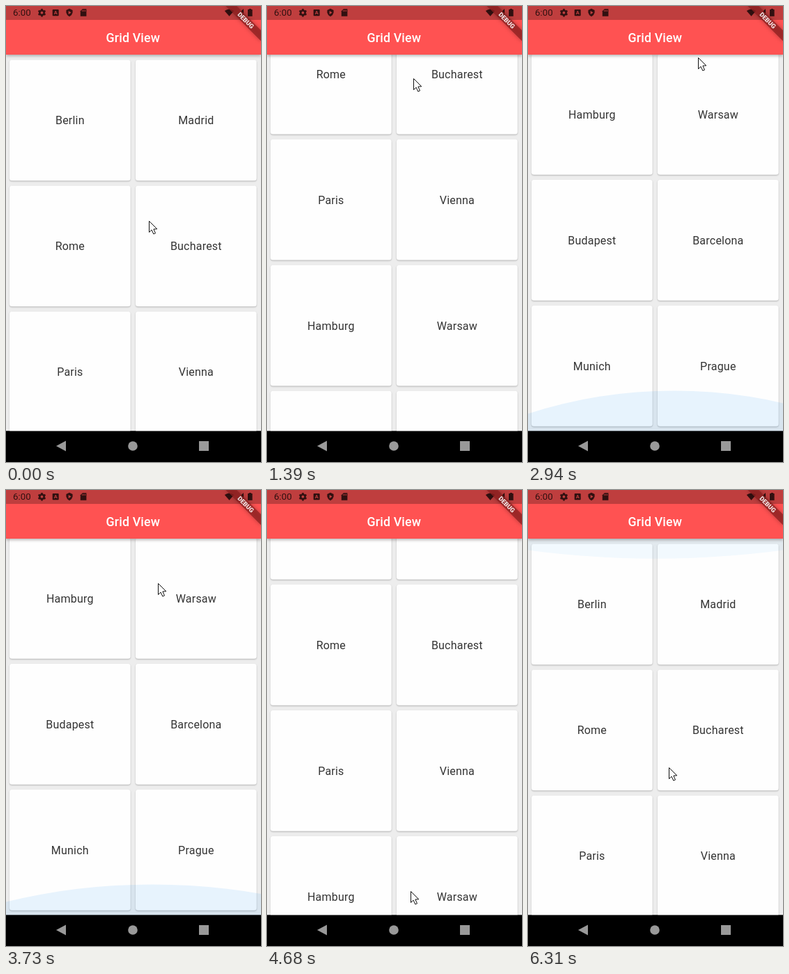
An HTML page with a canvas for the animation above (7200 ms loop, 366 by 656 pixels).

```html
<!DOCTYPE html>
<html lang="en">
<head>
<meta charset="utf-8">
<title>Grid View</title>
<style>
html, body { margin: 0; width: 100%; height: 100%; overflow: hidden; background: #000; }
canvas { display: block; width: 366px; height: 656px; }
</style>
</head>
<body>
<canvas id="stage" width="366" height="656"></canvas>
<script>
const ctx = document.getElementById('stage').getContext('2d');
const W = 366, LOOP = 7200, TOP = 70, BOTTOM = 611.6;
const PITCH = 181, CARD = 173.7, MAX_SCROLL = 551.5;
const FIRST = 400, STEP = 133.5;   // screen refresh, ms
const FONT = 'Roboto, "Open Sans", sans-serif';
const CITIES = ['Berlin', 'Madrid', 'Rome', 'Bucharest', 'Paris', 'Vienna',
  'Hamburg', 'Warsaw', 'Budapest', 'Barcelona', 'Munich', 'Prague'];

// Pointer way points: time, x, y
const PATH = [[267, 205, 309], [700, 210, 366], [934, 212, 351.5], [1334, 210, 104],
  [2136, 218, 108], [2269, 225, 279], [2536, 228, 305], [2936, 244, 74], [3337, 230, 106],
  [3738, 212, 148], [4138, 204, 260], [4672, 206, 577], [5070, 208, 648], [5340, 206, 389],
  [5607, 199, 282], [6030, 202, 399]];

// Each drag moves the grid with the pointer, then flings it on
const DRAGS = [
  { from: 934, to: 1334, fling: 152 },
  { from: 2536, to: 2936, fling: 0 },
  { from: 3738, to: 4672, fling: -122.5 },
];

const clamp = (v, lo = 0, hi = 1) => Math.min(hi, Math.max(lo, v));
const mix = (a, b, u) => a + (b - a) * u;
const ramp = (t, from, to) => clamp((t - from) / (to - from));
const easeOut = u => 1 - (1 - u) ** 3;

function pointerAt(t) {
  const i = PATH.findIndex(p => p[0] > t);
  if (i < 1) return PATH.at(i).slice(1);
  const [t0, x0, y0] = PATH[i - 1], [t1, x1, y1] = PATH[i], u = ramp(t, t0, t1);
  return [mix(x0, x1, u), mix(y0, y1, u)];
}

function scrollAt(t) {
  let s = 0;
  for (const { from, to, fling } of DRAGS) {
    if (t < from) break;
    const pulled = pointerAt(from)[1] - pointerAt(Math.min(t, to))[1];
    s = clamp(s + pulled + fling * easeOut(ramp(t, to, to + 900)), 0, MAX_SCROLL);
  }
  return s;
}

// Swells to full size, then shrinks to rest
function glowSize(t, from, peak, fall, rest, restSize) {
  return .79 * ramp(t, from, peak) - (.79 - restSize) * ramp(t, fall, rest);
}

function rect(x, y, w, h, color) {
  ctx.fillStyle = color;
  ctx.fillRect(x, y, w, h);
}

function poly(points, color) {
  ctx.beginPath();
  points.forEach(([x, y]) => ctx.lineTo(x, y));
  ctx.closePath();
  ctx.fillStyle = color;
  ctx.fill();
}

function rounded(x, y, w, h, r, color) {
  ctx.beginPath();
  ctx.roundRect(x, y, w, h, r);
  ctx.fillStyle = color;
  ctx.fill();
}

function text(str, x, y, size, color, weight = 400, spacing = 0, align = 'center') {
  ctx.font = `${weight} ${size}px ${FONT}`;
  ctx.letterSpacing = spacing + 'px';
  ctx.textAlign = align;
  ctx.fillStyle = color;
  ctx.fillText(str, x, y);
}

function withShadow(alpha, blur, dy, paint) {
  ctx.save();
  ctx.shadowColor = `rgba(0,0,0,${alpha})`;
  ctx.shadowBlur = blur;
  ctx.shadowOffsetY = dy;
  paint();
  ctx.restore();
}

function card(label, x, y) {
  withShadow(.25, 2, 1, () => rounded(x, y, CARD, CARD, 3.5, '#fefefe'));
  text(label, x + CARD / 2, y + 92.9, 16, '#343434', 400, .22);
}

// Overscroll glow: a wide circle flattened against one edge
function glow(size, x, edge, dir, alpha) {
  if (size <= 0) return;
  const r = W * 1.5, depth = 73.5;
  ctx.beginPath();
  ctx.ellipse(x, edge + dir * (depth - r) * size, r, r * size, 0, 0, Math.PI * 2);
  ctx.fillStyle = `rgba(33,150,243,${alpha})`;
  ctx.fill();
}

function grid(t) {
  const s = scrollAt(t);
  ctx.save();
  ctx.beginPath();
  ctx.rect(0, TOP, W, BOTTOM - TOP);
  ctx.clip();
  rect(0, TOP, W, BOTTOM - TOP, '#ededed');
  CITIES.forEach((city, i) => card(city, 5 + i % 2 * PITCH, 77.5 + (i >> 1) * PITCH - s));
  if (t < 3800) glow(glowSize(t, 2670, 2936, 3080, 3600, .6), 210, BOTTOM, -1, .1);
  glow(glowSize(t, 5640, 6000, 6030, 6270, .39), 183, TOP, 1, .05);
  ctx.restore();
}

function statusIcons() {
  const c = 'rgba(0,0,0,.74)', bar = '#bf3e3e';
  text('6:00', 10, 14.3, 13.3, c, 400, 0, 'left');

  // Gear
  ctx.strokeStyle = c;
  ctx.lineWidth = 2.6;
  ctx.beginPath();
  ctx.arc(51.5, 9.7, 3.2, 0, Math.PI * 2);
  for (let i = 0; i < 6; i++) {
    const a = (i + .5) * Math.PI / 3, dx = Math.cos(a), dy = Math.sin(a);
    ctx.moveTo(51.5 + dx * 4.4, 9.7 + dy * 4.4);
    ctx.lineTo(51.5 + dx * 5.7, 9.7 + dy * 5.7);
  }
  ctx.stroke();

  // Letter box
  rounded(66.7, 5, 9, 9.2, 1, c);
  text('A', 71.2, 12.3, 7.5, bar, 700);

  // Shield
  poly([[91, 3.8], [95.6, 6], [95.6, 9.5], [94, 13], [91, 15.3], [88, 13], [86.4, 9.5], [86.4, 6]], c);
  poly([[89.7, 7], [93.6, 9.5], [89.7, 12]], bar);

  // Memory card
  poly([[109.8, 4.2], [115.4, 4.2], [115.4, 14.8], [106.8, 14.8], [106.8, 7.2]], c);
  for (let i = 0; i < 3; i++) rect(109.2 + i * 1.9, 5.8, .9, 2.2, bar);

  // Wifi, signal, battery
  ctx.beginPath();
  ctx.moveTo(320.5, 14.8);
  ctx.lineTo(313.8, 7);
  ctx.quadraticCurveTo(320.5, 2, 327.2, 7);
  ctx.fillStyle = c;
  ctx.fill();
  poly([[341, 4], [341, 14.6], [330.4, 14.6]], c);
  rect(347, 5, 6.6, 9.8, c);
  rect(348.8, 4, 3, 1, c);
}

function appBar() {
  withShadow(.28, 4, 1.5, () => rect(0, 0, W, TOP, '#ff5252'));
  rect(0, 0, W, 20, 'rgba(0,0,0,.25)');
  text('Grid View', 182.3, 52, 17.8, '#fff', 500, .13);
  statusIcons();
}

function banner() {
  ctx.save();
  ctx.translate(W, 0);
  ctx.rotate(Math.PI / 4);
  withShadow(.7, 6, 0, () => rect(-35.6, 24.9, 71.2, 10.7, 'rgba(0,0,0,.4)'));
  rect(-35.6, 24.9, 71.2, 10.7, 'rgba(183,40,40,.6)');
  text('DEBUG', -.8, 33.3, 9.07, 'rgba(255,255,255,.88)', 900);
  ctx.restore();
}

function navBar() {
  const c = '#999';
  rect(0, BOTTOM, W, 45, '#000');
  poly([[72, 633], [86, 625.5], [86, 640.5]], c);
  rounded(175.2, 626.2, 13.6, 13.6, 6.8, c);
  rect(277, 626, 14, 14, c);
}

function pointer([x, y]) {
  ctx.save();
  ctx.translate(Math.round(x) + .5, Math.round(y) + .5);
  poly([[0, 0], [0, 16], [3.6, 12.6], [6.3, 18.5], [9, 17.4], [6.4, 11.5], [11.3, 11.3]], '#fff');
  ctx.strokeStyle = '#111';
  ctx.lineWidth = 1;
  ctx.stroke();
  ctx.restore();
}

function draw(time) {
  const t = Math.max(0, FIRST + Math.floor((time - FIRST) / STEP) * STEP);
  grid(t);
  appBar();
  banner();
  navBar();
  pointer(pointerAt(t));
}

const start = performance.now();
function loop() {
  draw((performance.now() - start) % LOOP);
  requestAnimationFrame(loop);
}
loop();
</script>
</body>
</html>
```
